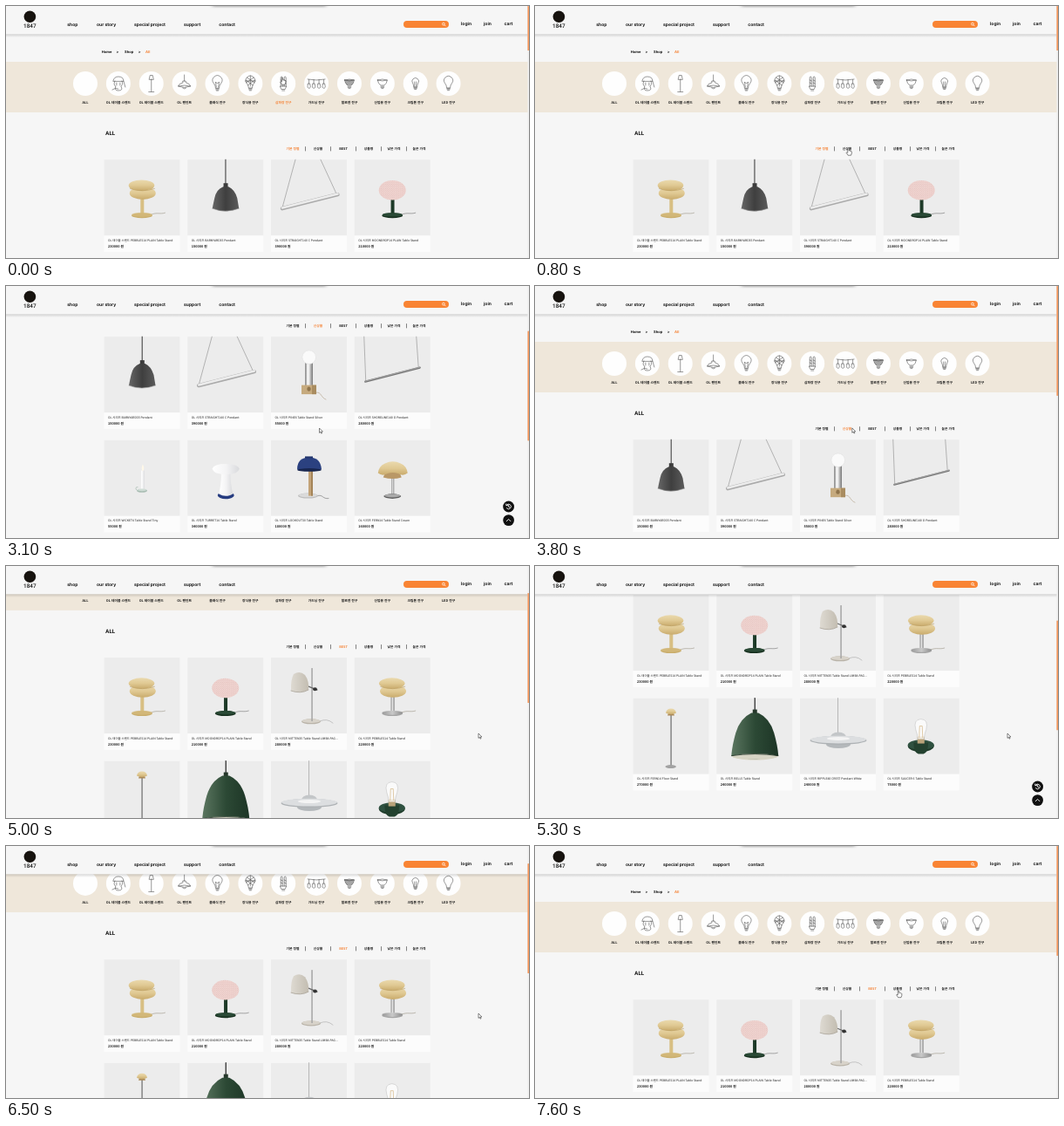
Animation of 600x289 px, one loop 8 s. Source, as an HTML page:

```html
<!DOCTYPE html>
<html lang="ko">
<head>
<meta charset="utf-8">
<title>Lamp shop</title>
<style>
html, body { margin: 0; height: 100%; overflow: hidden; background: #f6f6f6; }
svg { display: block; width: 100vw; height: 100vh; }
text { text-rendering: geometricPrecision; fill: #161616; font-family: "Noto Sans CJK KR", "Noto Sans CJK", sans-serif; }
.nav { font: 700 5px Inter, sans-serif; }
.crumb { font: 700 4.1px Inter, sans-serif; }
.label { font-size: 3.8px; font-weight: 700; text-anchor: middle; }
.name { font-size: 3.4px; font-weight: 500; }
.price { font-size: 3.8px; font-weight: 700; }
.on { fill: #f5853a; }
.line { fill: none; stroke: #444; stroke-width: .55; stroke-linecap: round; stroke-linejoin: round; }
</style>
</head>
<body>
<svg id="stage" viewBox="0 0 600 289" preserveAspectRatio="none" xmlns="http://www.w3.org/2000/svg"></svg>
<script>
const ORANGE = '#f98433', ROW = 118.5, COL = 95.75;

// Shape helpers
const ell = (x, y, rx, ry, fill, extra = '') =>
  `<ellipse cx="${x}" cy="${y}" rx="${rx}" ry="${ry}" fill="${fill}" ${extra}/>`;
const box = (x, y, w, h, fill, extra = '') =>
  `<rect x="${x}" y="${y}" width="${w}" height="${h}" fill="${fill}" ${extra}/>`;
const shape = (d, fill) => `<path d="${d}" fill="${fill}"/>`;
const wire = (d, color = '#777', width = .5) =>
  `<path d="${d}" fill="none" stroke="${color}" stroke-width="${width}" stroke-linecap="round"/>`;
const text = (x, y, cls, s, extra = '') => `<text x="${x}" y="${y}" class="${cls}" ${extra}>${s}</text>`;
const grad = (id, stops, vertical) =>
  `<linearGradient id="${id}" x2="${vertical ? 0 : 1}" y2="${vertical ? 1 : 0}">${stops.map((c, i) =>
    `<stop offset="${i / (stops.length - 1)}" stop-color="${c}"/>`).join('')}</linearGradient>`;

const defs = `<defs>
  ${grad('sand', ['#ead9ad', '#e0c993', '#c9ab6c'], true)}
  ${grad('steel', ['#8d8d8d', '#e6e6e6', '#777'])}
  ${grad('dark', ['#666', '#3f3f3f', '#5b5b5b'])}
  ${grad('green', ['#5b7660', '#2c4935', '#1d3526'])}
  ${grad('pale', ['#dedad2', '#c3bdb1'])}
  ${grad('white', ['#fff', '#f4f4f5', '#d9dadd'])}
  ${grad('shade', ['rgba(0,0,0,.16)', 'rgba(0,0,0,0)'], true)}
  <pattern id="dots" width="2.4" height="2.4" patternUnits="userSpaceOnUse">
    <circle cx=".6" cy=".6" r=".45" fill="#c99c9a"/><circle cx="1.8" cy="1.8" r=".45" fill="#c99c9a"/></pattern>
  <filter id="soft" x="-10%" y="-200%" width="120%" height="500%"><feGaussianBlur stdDeviation="2 1"/></filter>
</defs>`;

// Lamp drawings in an 87 x 87 tile
const snowman = (stem, base) =>
  wire('M54 63C61 60 64 63 70 61', '#8a8371') +
  box(41.8, 45, 4, 19, stem) + ell(43.5, 64, 12, 3, base) + ell(43.5, 63.2, 12, 2.6, stem, 'opacity=".55"') +
  ell(44.3, 38.5, 15, 7.3, 'url(#sand)') + ell(43, 29.5, 14.8, 6.2, 'url(#sand)') +
  wire('M30 33.4Q44 38 58 33.2', '#b99a5d', .6);

const art = {
  pebble: snowman('#d8bf83', '#c9ad6b'),
  pebbleSteel: snowman('url(#steel)', '#a5a5a5'),
  moon: wire('M54 63C61 60 64 63 70 61', '#555') +
    box(41.8, 45, 4, 19, '#1d3a28') + ell(43.5, 64, 12, 3, '#17301f') + ell(43.5, 63.2, 11.5, 2.2, '#2a4a36') +
    ell(43.5, 35, 15.5, 11.3, '#f1d6d2') + ell(43.5, 35, 15.5, 11.3, 'url(#dots)', 'opacity=".65"'),
  barn: wire('M43.7 0V28', '#333', 1) + box(41.3, 27, 5, 6, '#3c3c3c') +
    shape('M41 31Q33 34 31 44Q29 53 28.5 56Q43 62 59 56Q58.5 53 57 44Q54 34 47 31Z', 'url(#dark)') +
    wire('M28.5 56Q43 62 59 56', '#999', .6),
  tube: wire('M28 0L13 55M57 0L75 39') + wire('M13 56L76.5 40', '#aaa', 4.4) + wire('M13 55.3L76.5 39.3', '#ececec', 2.6),
  pine: wire('M52 64C58 63 57 70 63 72', '#a58e72') +
    box(39, 30, 9, 28, 'url(#steel)') + box(41, 31, 3, 26, '#f0f0f0') +
    box(35, 55.5, 17, 10.5, '#c6aa7e') + box(47, 55.5, 5, 10.5, '#a98c60') + ell(43.5, 60, 2.2, 2.6, '#8f744c') +
    ell(43.7, 23.5, 7.8, 7.8, '#fafafa', 'stroke="#ddd" stroke-width=".5"'),
  shore: wire('M11 0L13 51M71 0L73.5 36') + wire('M12.5 51.5L75 35.5', '#777', 2.2) + wire('M12.5 51L75 35', '#bbb', .7),
  candle: box(42.6, 35, 3.6, 22, 'url(#white)') + shape('M44.4 28Q47 33 44.4 36Q42 33 44.4 28Z', '#fff8e8') +
    ell(43.5, 58.2, 6, 1.9, '#a9bdb3') + ell(43.5, 57.2, 5.2, 1.4, '#cfdcd5') + wire('M37 57Q35 54 38.5 54', '#a9bdb3', .8),
  turret: ell(44, 63.5, 9.5, 4.2, '#263c80') +
    shape('M39 37Q38.5 52 36 62Q44 66.5 52 62Q49.5 52 49 37Z', 'url(#white)') +
    shape('M28.5 33Q30 27.5 44 27.5Q58 27.5 59.5 33Q58 39.5 44 39.5Q30 39.5 28.5 33Z', 'url(#white)'),
  lookout: wire('M53 64C60 62 59 68 66 67', '#555') + ell(42.5, 64, 11.5, 3, '#bcbcbc') + ell(42.5, 63.4, 10.5, 2.3, '#dadada') +
    box(43, 33, 5, 31, '#c3a378') + box(46, 33, 2, 31, '#a48458') +
    shape('M30 34Q30 20 44 20Q57 20 58 34Q44 37.5 30 34Z', '#2b4180') + ell(44, 34.3, 13.8, 1.8, '#18264f') +
    box(39, 18.8, 9, 2, '#22356c'),
  fern: box(42.5, 38, 3, 26, 'url(#steel)') + ell(43.5, 64.5, 10, 2.8, '#5e5e5e') + ell(43.5, 63.8, 9, 2, '#aaa') +
    shape('M33 43Q34 36 44 36Q53 36 54 43Q44 46 33 43Z', '#b99867') +
    shape('M27 38Q28 30 35 27Q44 22.5 53 27Q60 30 61 38Q56 42 50 38.5Q44 36.5 38 38.5Q32 42 27 38Z', 'url(#sand)'),
  mitten: wire('M56 73Q64 69 71 75', '#999') + ell(46, 73.3, 11, 3, '#b9b3a8') + ell(46, 72.6, 10.2, 2.4, '#d8d3ca') +
    box(46.3, 12, 1.5, 61, 'url(#steel)') + wire('M38 31L53 37', '#666', 1.2) + ell(50.5, 36.3, 2.4, 2, '#333') +
    shape('M26 19Q33 14.5 39 20Q44 27 43 37Q34 42 23 38Q22.5 25 26 19Z', 'url(#pale)') +
    wire('M23 38Q34 42 43 37', '#a9a397', .8),
  floor: box(42.8, 19, 1.6, 59, '#8b8b8b') + ell(43.2, 78.5, 6.3, 2, '#a2a2a2') +
    shape('M39.5 20Q40 17 43.5 17Q47 17 47.5 20Z', '#ab8a58') +
    shape('M37.5 17Q38.5 12 43.5 12Q48.5 12 49.5 17Q43.5 20 37.5 17Z', 'url(#sand)'),
  bell: wire('M44 0V15', '#333', 1.3) + box(41.5, 13, 5, 5, '#26382b') +
    ell(44, 66, 27, 5, '#d9d5c3') +
    shape('M40 17Q27 23 22 40Q18 54 17 66Q44 74 71 66Q70 54 66 40Q61 23 48 17Z', 'url(#green)') +
    ell(44, 67, 25.5, 3.3, '#d6d4c4') + wire('M17.3 66Q44 62 70.7 66', '#1b2f22', .8),
  ripple: wire('M43.5 0V40', '#aaa', .8) + shape('M34 46Q36 39 44 39Q52 39 54 46Z', '#c3c6c8') +
    ell(44, 53, 14, 4.5, '#b4b8bb') + ell(44, 48.4, 32.5, 5, '#aeb2b5') + ell(44, 47.5, 32, 4.4, '#dcdee0') +
    ell(44, 46.4, 13, 2, '#f4f4f4'),
  saucer: ell(43, 55, 15, 6.5, '#1f3b2a') + ell(43, 53.6, 15, 5.8, '#2f5140') +
    shape('M34.5 51Q35 63 40 64H46Q51 63 51.5 51Z', '#23412f') + box(39, 44, 8, 8, '#b9a37a') +
    shape('M39.5 47Q39 41 37 36Q34 24.5 43 24Q52 24.5 49 36Q47 41 46.5 47Z', 'rgba(255,255,255,.75)') +
    wire('M39.5 47Q39 41 37 36Q34 24.5 43 24Q52 24.5 49 36Q47 41 46.5 47', '#bbb') + wire('M41 45L41.5 32H44.5L45 45', '#c49a56')
};

const lamps = {
  pebble: ['OL 테이블 스탠드 PEBBLES14 PLAIN Table Stand', 230000],
  pebbleSteel: ['OL 시리즈 PEBBLES14 Table Stand', 220000],
  moon: ['OL 시리즈 MOONDROP14 PLAIN Table Stand', 210000],
  barn: ['OL 시리즈 BARNYARD35 Pendant', 150000],
  tube: ['OL 시리즈 STRAIGHT140 C Pendant', 390000],
  pine: ['OL 시리즈 PINE6 Table Stand Silver', 55000],
  shore: ['OL 시리즈 SHORELINE140 D Pendant', 280000],
  candle: ['OL 시리즈 WICKET4 Table Stand Tiny', 55000],
  turret: ['OL 시리즈 TURRET14 Table Stand', 340000],
  lookout: ['OL 시리즈 LOOKOUT30 Table Stand', 180000],
  fern: ['OL 시리즈 FERN14 Table Stand Cream', 160000],
  mitten: ['OL 시리즈 MITTEN35 Table Stand LIMBA PAG...', 280000],
  floor: ['OL 시리즈 FERN14 Floor Stand', 270000],
  bell: ['OL 시리즈 BELL5 Table Stand', 240000],
  ripple: ['OL 시리즈 RIPPLE48 CREST Pendant White', 240000],
  saucer: ['OL 시리즈 SAUCER 6 Table Stand', 75000]
};
const lists = [
  ['pebble', 'barn', 'tube', 'moon'],
  ['barn', 'tube', 'pine', 'shore', 'candle', 'turret', 'lookout', 'fern'],
  ['pebble', 'moon', 'mitten', 'pebbleSteel', 'floor', 'bell', 'ripple', 'saucer']
];

const card = (id, i) => {
  const [name, price] = lamps[id];
  return `<g transform="translate(${112.5 + i % 4 * COL} ${176.2 + Math.floor(i / 4) * ROW})">
    ${box(0, 0, 87, 105.8, '#fcfcfc')}${box(0, 0, 87, 87, '#ececec')}${art[id]}
    ${text(4.5, 93.6, 'name', name)}${text(4.5, 100.8, 'price', price + ' 원')}</g>`;
};

// Category icons, centred on 0,0
const bulb = r => `M-2 ${r * .9}Q-2 ${r * .4} ${-r * .8} ${-r * .1}A${r} ${r} 0 1 1 ${r * .8} ${-r * .1}Q2 ${r * .4} 2 ${r * .9}ZM-1.8 ${r * .9 + 1}H1.8M-1.6 ${r * .9 + 2.2}H1.6M-1 ${r * .9 + 3.2}H1`;
const reflector = 'M-5.5 -4Q0 -6 5.5 -4Q5 0 2 2H-2Q-5 0 -5.5 -4ZM-5.5 -4Q0 -2 5.5 -4M-2 3.2H2M-1.7 4.4H1.7M-1 5.6H1';
const icons = [
  '',
  'M-6 -3Q-5 -8 0 -8Q6 -8 6 -3ZM-4 -3Q-6 2 -3 3Q-5 8 0 8Q6 8 3 3Q6 1 4 -3M-2 -1V2M2 -1V2M-7 7Q-3 4 0 6M6 -3L8 4',
  'M-2.5 -5L-1.5 -9.5H1.5L2.5 -5ZM0 -5V9M-3 9.5H3',
  'M0 -10V-3M-1.5 -3H1.5L2 -1Q6.5 0 7 3Q0 6 -7 3Q-6.5 0 -2 -1ZM-7 3Q0 1 7 3M-2 5Q0 7 2 5',
  bulb(5.4) + 'M-1.2 4L-2 -2L0 0L2 -2L1.2 4',
  bulb(5.2) + 'M-5 -4L3 2M-4 -7L5 -1M5 -4L-3 2M4 -7L-5 -1M-6 -3H6M0 -9V3',
  'M-3 3V-7Q-2 -9.5 -1 -7V3M1 3V-7Q2 -9.5 3 -7V3M-3 -4L-1 -3M1 -4L3 -3M-3 -1L-1 0M1 -1L3 0M-3.5 3H3.5L2 6.5H-2ZM-1.5 8H1.5',
  'M-10 -5Q0 -3 10 -5' + [-8.5, -3, 3, 8.5].map(x => `M${x} -4.5V0M${x - 1} 0H${x + 1}L${x + 1.6} 3A1.7 1.7 0 1 1 ${x - 1.6} 3Z`).join(''),
  reflector + 'M-4 -3L4 -3M-4.5 -2H4.5M-4 -1H4M-3.5 0H3.5M-3 1H3M-5 -4H5',
  reflector,
  bulb(3.8) + 'M-1 3L-1 -2M1 3L1 -2',
  bulb(5)
];
const categories = ['ALL', 'OL 테이블 스탠드', 'OL 테이블 스탠드', 'OL 펜던트', '클래식 전구', '장식용 전구',
  '삼파장 전구', '가드닝 전구', '할로겐 전구', '산업용 전구', '크립톤 전구', 'LED 전구'];
const category = (label, i) => {
  const x = 91 + i * 37.87;
  return `<circle cx="${x}" cy="89" r="14" fill="#fefefe"/>
    <path class="line" transform="translate(${x} 89)" d="${icons[i]}"/>
    ${text(x, 111.9, 'label', label, `id="cat${i}"`)}`;
};
const sorts = ['기본 정렬', '신상품', 'BEST', '상품명', '낮은 가격', '높은 가격'];
const sort = (label, i) => text(329 + i * 29, 165.2, 'label', label, `id="sort${i}"`) +
  (i ? box(314.3 + i * 29, 161.2, .6, 5.2, '#333') : '');

const nav = [[70.3, 'shop'], [104, 'our story'], [147, 'special project'], [204, 'support'], [244.3, 'contact']];
const account = [[522, 'login'], [548, 'join'], [571.5, 'cart']];
const crumbs = [[109.8, 'Home'], [126.5, '&gt;'], [136, 'Shop'], [151.7, '&gt;'], [160, 'All', 'on']];
const roundButton = (y, d) => `<g transform="translate(576.6 ${y})"><circle r="6.4" fill="#111"/>${wire(d, '#fff', .9)}</g>`;

const stage = document.getElementById('stage');
stage.innerHTML = `${defs}${box(0, 0, 600, 289, '#f6f6f6')}
<g id="page">
  ${crumbs.map(([x, s, cls = '']) => text(x, 53.5, 'crumb ' + cls, s)).join('')}
  ${box(0, 64, 600, 58, '#efe7da')}
  ${categories.map(category).join('')}
  ${text(114, 148.2, 'nav', 'ALL', 'style="font-size:6px"')}
  ${sorts.map(sort).join('')}
  ${lists.map((ids, i) => `<g id="list${i}">${ids.map(card).join('')}</g>`).join('')}
</g>
<g id="floating">
  ${roundButton(253, 'M-2.4 -1.6A2.8 2.8 0 1 1 -2.2 1.8M-2.8 -3V-1.3H-1M0 -1.4V.2L1.2 .8')}
  ${roundButton(268.6, 'M-2.3 1.1L0 -1.2L2.3 1.1')}
</g>
${box(0, 32, 600, 4, 'url(#shade)')}${box(0, 0, 600, 32.3, '#f6f6f6')}
${box(237, -3, 130, 4, 'rgba(0,0,0,.3)', 'filter="url(#soft)"')}
<circle cx="27.4" cy="12.2" r="6.8" fill="#17130f"/>
${text(20, 25.3, '', '1847', 'style="font:500 6.4px Roboto,sans-serif"')}
${nav.concat(account).map(([x, s]) => text(x, x > 500 ? 22 : 22.6, 'nav', s)).join('')}
${box(456, 17, 52, 8, ORANGE, 'rx="4"')}
<circle cx="501.9" cy="20.6" r="1.4" fill="none" stroke="#fff" stroke-width=".7"/>${wire('M503 21.7L504.2 22.9', '#fff', .8)}
${box(598.4, 0, 1.6, 289, '#efefef')}
<rect id="thumb" x="598.4" width="1.6" fill="#f5965a" rx=".6"/>
<g id="pointer" fill="#fff" stroke="#222" stroke-width=".55" stroke-linejoin="round">
  <path id="arrow" d="M0 0V5.4L1.3 4.3L2.2 6.2L3 5.8L2.2 4H3.9Z"/>
  <path id="hand" d="M-.7 .6Q0 -.4 .7 .6V3Q1.3 2.5 1.8 3.2Q2.5 2.8 2.8 3.5Q3.6 3.2 3.8 4.1V6L3 8.2H-.4L-2.3 5.4Q-2.4 4.3 -.7 5.2Z"/>
</g>`;

const el = id => document.getElementById(id);
const show = (id, on) => el(id).setAttribute('display', on ? 'inline' : 'none');
const smooth = u => u * u * (3 - 2 * u);
const linear = u => u;

// Each move: start, end, target, easing
const follow = (t, start, moves) => moves.reduce((v, [a, b, to, ease = smooth]) =>
  v + (to - v) * ease(Math.min(1, Math.max(0, (t - a) / (b - a)))), start);
const scrolls = [[2100, 2780, 125], [3000, 3700, 0], [4600, 5450, 156], [5700, 6835, 0, linear]];
const pointerMoves = [[100, 800, 359.5, 163], [3700, 4100, 387, 162], [4400, 4900, 542, 192], [6900, 7500, 417, 165.5]];
const axis = k => pointerMoves.map(m => [m[0], m[1], m[k]]);
const handTimes = [[0, 200], [700, 2300], [3900, 4500], [7400, 8000]];

function render(t) {
  const scroll = follow(t, 0, scrolls);
  const list = t < 1500 ? 0 : t < 4200 ? 1 : 2;
  const height = list ? 663 : 1638;

  el('page').setAttribute('transform', `translate(0 ${-scroll})`);
  lists.forEach((_, i) => {
    show('list' + i, i === list);
    el('sort' + i).classList.toggle('on', i === list);
  });
  el('cat6').classList.toggle('on', t < 200);
  show('floating', scroll > 95);
  el('thumb').setAttribute('y', scroll * 289 / height);
  el('thumb').setAttribute('height', 289 * 289 / height);

  const hand = handTimes.some(([a, b]) => t >= a && t < b);
  show('hand', hand);
  show('arrow', !hand);
  el('pointer').setAttribute('transform', `translate(${follow(t, 317, axis(2))} ${follow(t, 82, axis(3))})`);
}

const began = performance.now();
function tick() {
  const t = (performance.now() - began) % 8000;
  render(Math.floor(t / 100) * 100);
  requestAnimationFrame(tick);
}
tick();
</script>
</body>
</html>
```
